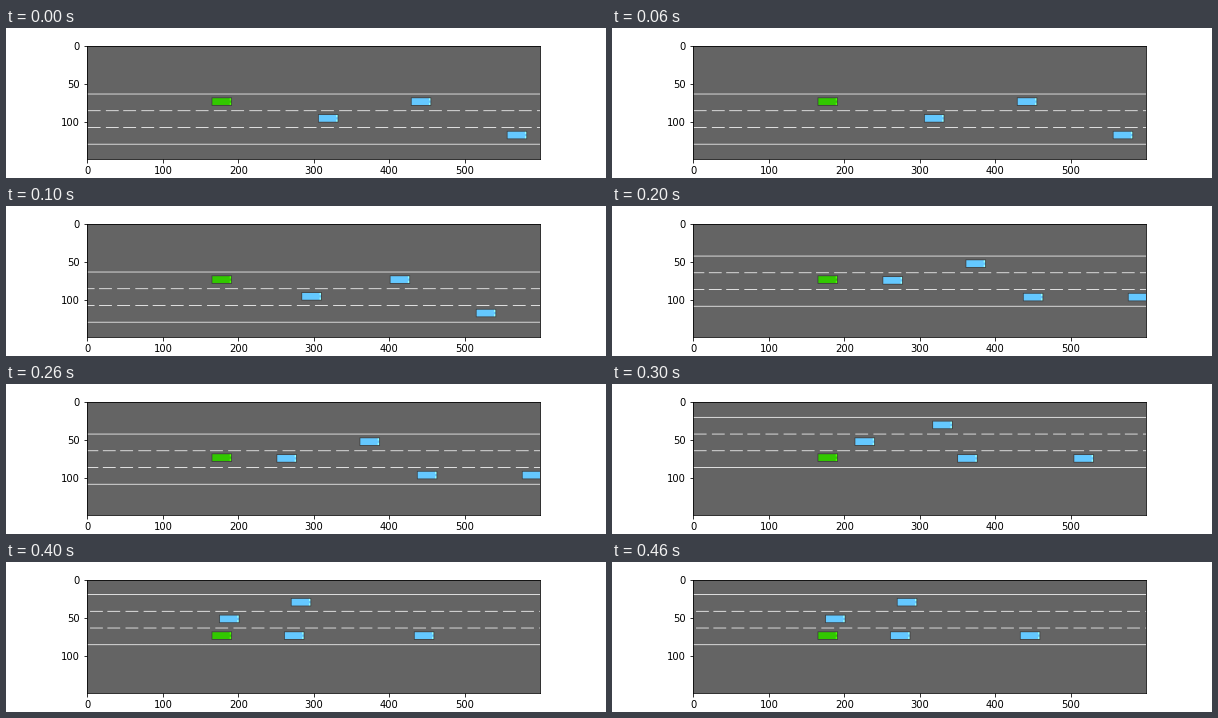
Write a matplotlib script that moves like this. It is 600x150 px and loops after 500 ms.

```python
import numpy as np
import matplotlib.pyplot as plt
from matplotlib.animation import FuncAnimation

plt.rcParams["font.family"] = "DejaVu Sans"
plt.rcParams["font.size"] = 10

W, H = 600, 150
LANE = 22                      # lane width in road pixels
CAR_W, CAR_H = 27, 11
STRIPE, PERIOD = 17, 4.33 * 5.5

ASPHALT = (100, 100, 100)
WHITE = (255, 255, 255)
OUTLINE = (60, 60, 60)
GREEN = (50, 200, 0)
BLUE = (100, 200, 255)

EGO = (165, 69)
ROAD_TOP = [64, 64, 43, 21, 20]          # the view follows the green car
STRIPE_START = [1.3, 16.5, 21, 1.4, 4]

# lane index and left edge at each step
TRAFFIC = [
    (1, [306, 284, 251, 214, 175]),
    (0, [429, 401, 361, 317, 270]),
    (2, [556, 515, 437, 350, 261]),
    (2, [700, 640, 576, 504, 433]),
]


def lighten(color):
    return [min(int(c / 0.68), 255) for c in color]


def draw_car(road, x, y, color):
    car = np.full((CAR_H, CAR_W, 3), OUTLINE, dtype=np.uint8)
    car[1:-1, 1:-1] = color
    car[1:4, -3:-1] = car[7:10, -3:-1] = lighten(color)   # headlights
    spot = road[y:y + CAR_H, x:x + CAR_W]
    spot[:] = car[:, :spot.shape[1]]


def draw_lanes(road, top, start):
    road[[top, top + 3 * LANE]] = WHITE
    for x in np.arange(start - PERIOD, W, PERIOD):
        a, b = max(int(x), 0), max(int(x) + STRIPE, 0)
        road[[top + LANE, top + 2 * LANE], a:b] = WHITE


def render(step):
    road = np.full((H, W, 3), ASPHALT, dtype=np.uint8)
    top = ROAD_TOP[step]
    draw_lanes(road, top, STRIPE_START[step])
    for lane, xs in TRAFFIC:
        draw_car(road, xs[step], top + 5 + lane * LANE, BLUE)
    draw_car(road, *EGO, GREEN)
    return road


fig, ax = plt.subplots(figsize=(W / 72, H / 72), dpi=72)
fig.subplots_adjust(left=0.125, right=0.9, bottom=0.125, top=0.88)
view = ax.imshow(render(0))
ax.set_xticks(range(0, W, 100))
ax.set_yticks(range(0, H, 50))


def update(step):
    view.set_data(render(step))
    return [view]


anim = FuncAnimation(fig, update, frames=len(ROAD_TOP), interval=100,
                     repeat=True, repeat_delay=0)
plt.show()
```
